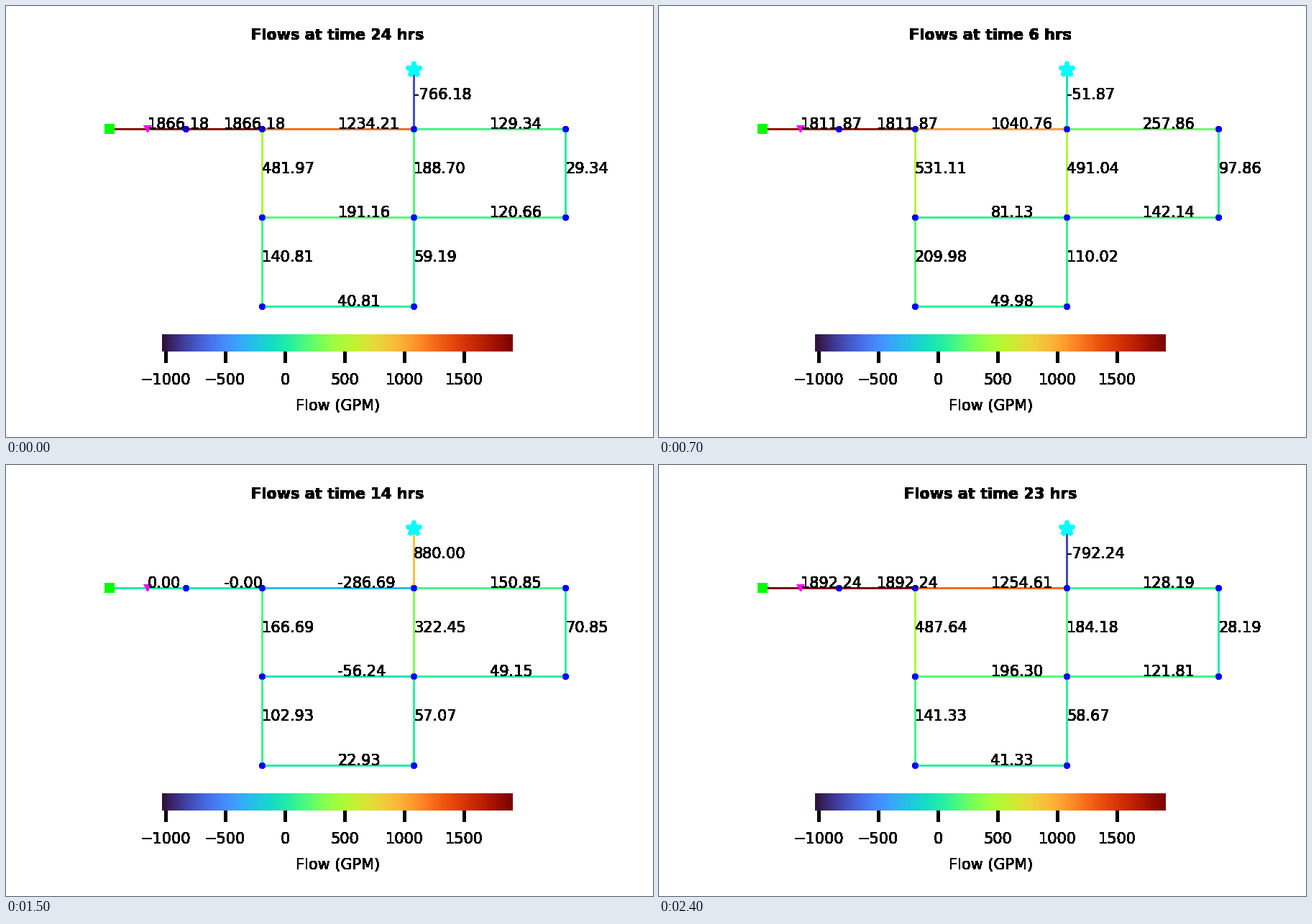
A matplotlib script that plays this animation: 900x600 px, repeating every 2.5 s.

```python
import numpy as np
import matplotlib.pyplot as plt
from matplotlib.animation import FuncAnimation

plt.rcParams["font.family"] = "DejaVu Sans"
plt.rcParams["font.size"] = 10

GPM = 448.831  # gallons per minute in one cubic foot per second
HOURS = 25

# Grid nodes are numbered row then column; 10 feeds them from the reservoir.
RESERVOIR, TANK, FEED = 9, 2, 10
GRID = [11, 12, 13, 21, 22, 23, 31, 32]
NODES = [FEED] + GRID
SPOTS = {n: (10 + 20 * (n % 10), 100 - 30 * (n // 10)) for n in GRID}
SPOTS.update({RESERVOIR: (10, 70), FEED: (20, 70), TANK: (50, 90)})

STREETS = [(a, b) for a in GRID for b in (a + 1, a + 10) if b in GRID]
PIPES = [(FEED, 11), (TANK, 12)] + STREETS
LINKS = [(RESERVOIR, FEED)] + PIPES  # the pump comes first
TANK_LINK = LINKS.index((TANK, 12))

# Usual demand, diameter and length, with the exceptions
DEMANDS = {FEED: 0, 13: 100, 22: 200, 31: 100, 32: 100}
INCHES = {(FEED, 11): 18, (TANK, 12): 18, (11, 12): 14, (22, 23): 12,
          (12, 22): 12, (13, 23): 8, (21, 31): 8, (31, 32): 6, (22, 32): 6}
FEET = {(FEED, 11): 10530, (TANK, 12): 200}
demand = np.array([DEMANDS.get(n, 150) for n in NODES]) / GPM
diam = np.array([INCHES.get(p, 10) for p in PIPES]) / 12
length = np.array([FEET.get(p, 5280) for p in PIPES])

TANK_AREA = np.pi / 4 * 50.5 ** 2
LOW, HIGH = 110, 140

# head loss of a link: res * q ** power - lift
PUMP_Q, PUMP_H = 1500 / GPM, 250
power = np.array([2.0] + [1.852] * len(PIPES))
res = np.append(PUMP_H / 3 / PUMP_Q ** 2,
                4.727 * length * 100 ** -1.852 * diam ** -4.871)
lift = np.zeros(len(LINKS))
lift[0] = PUMP_H * 4 / 3


def incidence(names):
    return np.array([[(a == n) * 1.0 - (b == n) for n in names] for a, b in LINKS])


FREE, FIXED = incidence(NODES), incidence([RESERVOIR, TANK])


def demand_factor(t):
    """Triangle wave over a day in two-hour steps."""
    return 1.6 - 0.2 * abs((t // 7200 + 3) % 12 - 6)


def solve(q, level, factor, pump_on):
    """Global gradient iteration, started from the previous flows."""
    known = FIXED @ np.array([800, 850 + level])
    for _ in range(40):
        grad = np.maximum(power * res * np.abs(q) ** (power - 1), 1e-7)
        loss = grad * q / power - lift
        if not pump_on:
            grad[0] = 1e8
            loss[0] = grad[0] * q[0]
        base = q + (known - loss) / grad
        head = np.linalg.solve(FREE.T @ (FREE / grad[:, None]),
                               -demand * factor - FREE.T @ base)
        new = base + FREE @ head / grad
        error = np.abs(new - q).sum() / np.abs(new).sum()
        q = new
        if error <= 0.001:
            break
    return q


def simulate():
    q = np.append(PUMP_Q, np.pi / 4 * diam ** 2)
    level, rate, t, pump_on = 120.0, 0.0, 0, True
    rows = []
    while len(rows) < HOURS:
        if level >= HIGH - abs(rate):
            pump_on = False
        elif level <= LOW + abs(rate):
            pump_on = True
        q = solve(q, level, demand_factor(t), pump_on)
        if t % 3600 == 0:
            row = q * GPM
            if not pump_on:
                row[0] = 0.0
            rows.append(row)
        rate = -q[TANK_LINK] / TANK_AREA
        step = 3600 - t % 3600
        reach = round(((HIGH if rate > 0 else LOW) - level) / rate)
        if 0 < reach < step:
            step = reach
        level += rate * step
        t += step
    return np.array(rows)


flows = simulate()
vmin, vmax = flows.min(), flows.max()
cmap = plt.get_cmap("turbo")


def scale(v):
    return (v - vmin) / (vmax - vmin)


def place(x, y):
    return 112.5 + (x - 7) * 697.5 / 66, 72 + (94 - y) * 362.3 / 88


def add_layer(cutoff):
    """Full-stage axes in pixels whose soft edges become opaque."""
    def harden(image, dpi):
        image = image.copy()
        image[..., 3] = image[..., 3] > cutoff
        return image, 0, 0

    layer = fig.add_axes([0, 0, 1, 1], xlim=(0, 900), ylim=(600, 0))
    layer.set_axis_off()
    layer.set_autoscale_on(False)
    layer.set_agg_filter(harden)
    return layer


fig = plt.figure(figsize=(6, 4), dpi=150, facecolor="white")
shapes, words = add_layer(0.125), add_layer(0.03)

# colour bar
LEFT, RIGHT, TOP, BOTTOM = 217, 705, 457, 481
shapes.imshow(np.linspace(0, 1, 256)[None], cmap=cmap, aspect="auto",
              extent=(LEFT, RIGHT, BOTTOM, TOP))
for v in range(-1000, 1501, 500):
    x = LEFT + (RIGHT - LEFT) * scale(v)
    shapes.plot([x, x], [BOTTOM, 496], color="black", lw=2.4, solid_capstyle="butt")
    words.text(x, 527, str(v).replace("-", "\u2212"), ha="center")
words.text(461.25, 563, "Flow (GPM)", ha="center")
title = words.text(461.25, 47, "", ha="center", weight="bold")

# network
lines, labels = [], []
for a, b in LINKS:
    (xa, ya), (xb, yb) = place(*SPOTS[a]), place(*SPOTS[b])
    lines += shapes.plot([xa, xb], [ya, yb], lw=1.44, zorder=2)
    labels.append(words.text((xa + xb) / 2, (ya + yb) / 2, ""))


def mark(spot, shape, color, size, edge=1.0):
    shapes.plot(*place(*spot), shape, color=color, ms=size, mew=edge, zorder=3)


for n in NODES:
    mark(SPOTS[n], "o", "blue", 3)
mark(SPOTS[RESERVOIR], "s", "lime", 6)
mark(SPOTS[TANK], "*", "cyan", 10, 2.4)
mark((15, 70), "v", "magenta", 3.5)

shapes.set(xlim=(0, 900), ylim=(600, 0))


def update(i):
    title.set_text(f"Flows at time {(i - 1) % HOURS} hrs")
    for line, label, v in zip(lines, labels, flows[i]):
        line.set_color(cmap(scale(v)))
        label.set_text(f"{v:.2f}")
    return [title, *lines, *labels]


anim = FuncAnimation(fig, update, frames=HOURS, interval=100,
                     repeat=True, repeat_delay=0, blit=False)
plt.show()
```
